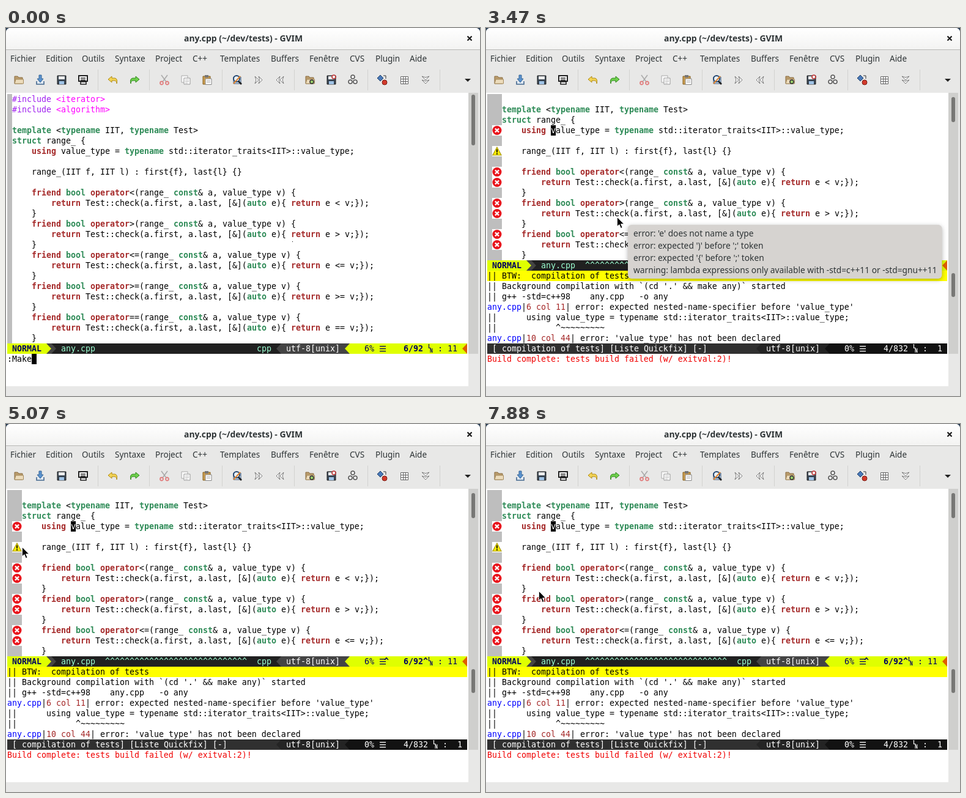
Recreate the animation shown at these times as an HTML page with a canvas. Size 775 px wide and 602 px high, loop 8 s.

```html
<!DOCTYPE html>
<html lang="fr">
<head>
<meta charset="utf-8">
<title>GVIM</title>
<style>
html, body { margin: 0; width: 100%; height: 100%; overflow: hidden; background: #e8e8e7; }
canvas { display: block; }
</style>
</head>
<body>
<canvas id="stage" width="775" height="602"></canvas>
<script>
const ctx = document.getElementById('stage').getContext('2d');
const LOOP = 8000, LEFT = 2, TOP = 108, CELL = 8, ROW = 17;
const MONO = '13.29px "DejaVu Sans Mono", monospace';
const SANS = '"Noto Sans", sans-serif';
const YELLOW = '#dfff00', NAVY = '#00005f', MINT = '#9cffd3', GREEN = '#2e8b57', BROWN = '#a52a2a';

const rowTop = row => TOP + row * ROW;

function rect(x, y, w, h, color) {
  ctx.fillStyle = color;
  ctx.fillRect(x, y, w, h);
}

function shape(x, y, d, fill, stroke, width = 1) {
  const path = new Path2D(d);
  ctx.save();
  ctx.translate(x, y);
  if (fill) { ctx.fillStyle = fill; ctx.fill(path); }
  if (stroke) { ctx.strokeStyle = stroke; ctx.lineWidth = width; ctx.stroke(path); }
  ctx.restore();
}

function label(str, x, y, font, color = '#2e3436') {
  ctx.font = font;
  ctx.fillStyle = color;
  ctx.fillText(str, x, y);
}

function put(x, row, str, color = '#000', bold = false) {
  label(str, x, rowTop(row) + 13, (bold ? 'bold ' : '') + MONO, color);
}

// ---------- source code ----------
const code = [
  '#include <iterator>', '#include <algorithm>', '',
  'template <typename IIT, typename Test>', 'struct range_ {',
  '    using value_type = typename std::iterator_traits<IIT>::value_type;', '',
  '    range_(IIT f, IIT l) : first{f}, last{l} {}', '',
  ...['<', '>', '<=', '>=', '=='].flatMap(op => [
    `    friend bool operator${op}(range_ const& a, value_type v) {`,
    `        return Test::check(a.first, a.last, [&](auto e){ return e ${op} v;});`,
    '    }'])
];
const TOKENS = /(#include)|(<iterator>|<algorithm>)|\b(using|friend|operator|return)\b|\b(template|typename|struct|bool|const|auto)\b/g;
const TOKEN_COLORS = ['#a020f0', '#ff00ff', BROWN, GREEN];

function codeLine(x, row, line) {
  let last = 0;
  for (const m of line.matchAll(TOKENS)) {
    put(x + last * CELL, row, line.slice(last, m.index));
    const kind = m.slice(1).findIndex(Boolean);
    put(x + m.index * CELL, row, m[0], TOKEN_COLORS[kind], kind > 1);
    last = m.index + m[0].length;
  }
  put(x + last * CELL, row, line.slice(last));
}

function errorSign(row) {
  const y = rowTop(row) + 8.5;
  rect(10, y - 8.5, 16, ROW, '#fff');
  shape(18, y, 'M-7.5 0a7.5 7.5 0 1 0 15 0a7.5 7.5 0 1 0 -15 0', '#e8141c');
  shape(18, y, 'M-3 -3L3 3M3 -3L-3 3', null, '#fff', 2.4);
}

function warningSign(row) {
  const y = rowTop(row) + 8.5;
  rect(10, y - 8.5, 16, ROW, '#fff');
  shape(18, y, 'M0 -6.5L7 6.5H-7Z', '#ffee00', '#a89800', 1.2);
  shape(18, y, 'M0 -3V2M0 3.3V5.2', null, '#000', 1.8);
}

// ---------- status lines ----------
function arrow(x, row, dir, color) {
  shape(dir > 0 ? x : x + CELL, rowTop(row), `M0 0L${dir * CELL} 8.5L0 17Z`, color);
}

function menuGlyph(x, row, color) {
  for (let i = 0; i < 3; i++) rect(x + 1, rowTop(row) + 4 + i * 4, 10, 1.3, color);
}

function lineGlyph(x, row, color) {
  const y = rowTop(row), font = 'bold 8px "DejaVu Sans Mono", monospace';
  label('L', x, y + 8, font, color);
  label('N', x + 3, y + 15, font, color);
}

function editorStatus(row, building, carets) {
  const y = rowTop(row), end = building ? 210 : 74;
  rect(2, y, 752, ROW, '#202020');
  rect(66, y, end - 66, ROW, '#444');
  arrow(end, row, 1, '#444');
  rect(2, y, 64, ROW, YELLOW);
  arrow(66, row, 1, YELLOW);
  put(10, row, 'NORMAL', NAVY, true);
  if (building) {
    put(82, row, '^^', '#fff');
    shape(98, y, 'M0 0L8 8.5L0 17', null, '#fff');
    put(106, row, '^Build^tests', '#fff');
  }
  put(end + 16, row, 'any.cpp', MINT);
  if (carets) put(end + 88, row, '^'.repeat((394 - end - 88) / CELL), MINT);
  put(410, row, 'cpp', MINT);
  arrow(442, row, -1, '#444');
  rect(450, y, 112, ROW, '#444');
  put(458, row, 'utf-8[unix]', '#fff');
  arrow(554, row, -1, YELLOW);
  rect(562, y, 192, ROW, YELLOW);
  put(586, row, '6%', NAVY);
  menuGlyph(610, row, NAVY);
  if (carets) put(618, row, '^', NAVY, true);
  put(650, row, carets ? '6/92^' : '6/92', NAVY, true);
  lineGlyph(690, row, NAVY);
  put(706, row, ': 11', NAVY);
  arrow(746, row, -1, '#df5f00');
}

function quickfixStatus(done) {
  const row = 24, y = rowTop(row), shift = done ? 0 : 16;
  rect(2, y, 752, ROW, '#303030');
  arrow(442 + shift, row, -1, '#242424');
  rect(450 + shift, y, 304 - shift, ROW, '#242424');
  arrow(554 + shift, row, -1, '#121212');
  rect(562 + shift, y, 192 - shift, ROW, '#121212');
  put(10, row, '[ compilation of tests] [Liste Quickfix] [-]', '#fff');
  put(458 + shift, row, 'utf-8[unix]', '#fff');
  put(done ? 586 : 594, row, done ? '0%' : '50%', '#fff');
  menuGlyph(610 + shift, row, '#fff');
  put(650 + shift, row, done ? '4/832' : '1/2', '#fff');
  lineGlyph(698, row, '#fff');
  put(714, row, ':  1', '#fff');
}

const log = [
  '|| BTW:  compilation of tests',
  "|| Background compilation with `(cd '.' && make any)` started",
  '|| g++ -std=c++98    any.cpp   -o any',
  "any.cpp|6 col 11| error: expected nested-name-specifier before 'value_type'",
  '||      using value_type = typename std::iterator_traits<IIT>::value_type;',
  '||            ^~~~~~~~~~',
  "any.cpp|10 col 44| error: 'value_type' has not been declared"
];

function quickfix(count) {
  rect(2, rowTop(17), 752, ROW, '#ff0');
  log.slice(0, count).forEach((line, i) => {
    let x = LEFT;
    line.split('|').forEach((part, k, parts) => {
      if (k < 2) {
        put(x, 17 + i, part, k ? BROWN : '#00f');
        x += part.length * CELL;
        put(x, 17 + i, '|');
        x += CELL;
      } else put(x, 17 + i, part);
    });
  });
}

// ---------- window frame ----------
const menus = { Fichier: 8, Edition: 66, Outils: 125, Syntaxe: 179, Project: 245, 'C++': 306, Templates: 351,
  Buffers: 434, 'Fenêtre': 497, CVS: 563, Plugin: 605, Aide: 661 };

const FLOPPY = 'M-7 -7H7V7H-7Z', GEAR = 'M-3 0a3 3 0 1 0 6 0a3 3 0 1 0 -6 0';

function floppy(x) {
  shape(x, 85, FLOPPY, '#3a4653', '#222');
  rect(x - 5, 79, 10, 5, '#eee');
  rect(x - 4, 87, 8, 5, '#9fc3e6');
}

function folder(x) {
  shape(x, 85, 'M-7 6V-6H-2L0 -4H6V6Z', '#b99b6c', '#8a6c40');
  shape(x, 85, 'M-5 -1H7.5V6H-7Z', '#ecdcbc', '#a58a5c');
}

function chevrons(x, angle) {
  ctx.save();
  ctx.translate(x, 85);
  ctx.rotate(angle);
  for (const dx of [-6, 0]) shape(dx, 0, 'M0 -6L6 0L0 6L2 0Z', '#fff', '#777');
  ctx.restore();
}

function toolbar() {
  for (const x of [151, 235, 354, 472, 592, 710]) rect(x - 1, 68, 1, 34, '#d2d2d0');
  folder(21);
  shape(56, 85, 'M-6 2V7H6V2', '#dfe8f2', '#44688f', 1.6);
  shape(56, 85, 'M-2 -8H2V-2H5L0 4L-5 -2H-2Z', '#5b93cf', '#356496');
  floppy(91);
  shape(126, 85, 'M-7 -7H7V2H-7Z', '#fff', '#222', 2);
  shape(126, 85, 'M-4 -3H4M-4 0H4', null, '#222', 1.4);
  shape(126, 85, 'M-4 3H5V7H-4Z', '#eee', '#222', 1.6);
  const back = 'M-8 -1L-2 -6V-3H3Q8 -2 6 6Q6 1 2 1H-2V4Z';
  shape(175, 85, back, '#f3d454', '#b18b14');
  ctx.save();
  ctx.translate(210, 85);
  ctx.scale(-1, 1);
  shape(0, 0, back, '#6fd04c', '#2f8a1c');
  ctx.restore();
  shape(259, 85, 'M-5 -8L3 3M5 -8L-3 3', null, '#aaa', 1.6);
  shape(259, 85, 'M-7 5a2.5 2.5 0 1 0 5 0a2.5 2.5 0 1 0 -5 0M2 5a2.5 2.5 0 1 0 5 0a2.5 2.5 0 1 0 -5 0', null, '#e08080', 1.8);
  shape(294, 85, 'M-7 -7H3V4H-7Z', '#f8f8f8', '#aaa');
  shape(294, 85, 'M-3 -3H7V7H-3Z', '#fcfcfc', '#999');
  shape(294, 85, 'M-1 0H5M-1 2.5H5M-1 5H3', null, '#bbb');
  shape(329, 85, 'M-7 -6H5V7H-7Z', '#c99b4e', '#86601f');
  rect(325, 77, 6, 4, '#777');
  shape(329, 85, 'M-3 -2H7V7.5H-3Z', '#fff', '#888');
  shape(329, 85, 'M-1 1H5M-1 3.5H5', null, '#aaa');
  shape(378, 85, 'M-6 -5H6V6H-6Z', '#cfe0f2', '#36577d');
  shape(378, 85, 'M-6 -2a5 5 0 1 0 10 0a5 5 0 1 0 -10 0', '#e6f0fa', '#23456e', 2);
  shape(378, 85, 'M2 2L7 7', null, '#222', 2.6);
  shape(378, 85, 'M-6 6L5 -6', null, '#e0822c', 2);
  chevrons(413, 0);
  chevrons(448, Math.PI);
  folder(497);
  shape(500, 88, GEAR, '#9ad06a', '#333', 1.5);
  floppy(532);
  shape(536, 80, GEAR, '#f0f0f0', '#b33', 1.5);
  for (const [x, y] of [[567, 80], [563, 88], [571, 88]]) shape(x, y, GEAR, '#f4f4f4', '#555', 1.5);
  shape(612, 82, 'M0 -5L5 0L0 5L-5 0Z', '#4979b8', '#23426b');
  shape(619, 89, 'M-4 0a4 4 0 1 0 8 0a4 4 0 1 0 -8 0', '#d33a2c', '#7c1c14');
  shape(619, 80, 'M-2 -2H2V3', null, '#333');
  shape(651.5, 85.5, 'M-6 -6H6V6H-6ZM-2 -6V6M2 -6V6M-6 -2H6M-6 2H6', '#fff', '#666');
  chevrons(686, Math.PI / 2);
  shape(755, 85, 'M-5 -2H5L0 3Z', '#222');
}

function frame() {
  rect(0, 0, 775, 602, '#263b52');
  ctx.beginPath();
  ctx.roundRect(0, 0, 775, 602, [7, 7, 0, 0]);
  ctx.fillStyle = '#e8e8e7';
  ctx.fill();
  const shine = ctx.createLinearGradient(0, 0, 0, 35);
  shine.addColorStop(0, '#fff');
  shine.addColorStop(1, '#f3f3f2');
  ctx.beginPath();
  ctx.roundRect(0, 0, 775, 35, [7, 7, 0, 0]);
  ctx.fillStyle = shine;
  ctx.fill();
  rect(0, 35, 775, 1, '#b8b8b5');
  ctx.textAlign = 'center';
  label('any.cpp (~/dev/tests) - GVIM', 388, 22, `bold 13.9px ${SANS}`);
  ctx.textAlign = 'left';
  shape(758, 17, 'M-3.5 -3.5L3.5 3.5M3.5 -3.5L-3.5 3.5', null, '#111', 2);
  for (const name in menus) label(name, menus[name] - 1, 55, `13.5px ${SANS}`);
  toolbar();
  rect(0, 106, 756, 480, '#fff');
  rect(756, 106, 16, 427, '#cfcfcd');
}

function thumb(y, h) {
  ctx.beginPath();
  ctx.roundRect(761, y, 6, h, 3);
  ctx.fillStyle = '#777775';
  ctx.fill();
}

// ---------- pointer and balloons ----------
const balloons = {
  lambda: { fill: '#d6d3d0', lines: ["error: 'e' does not name a type", "error: expected ')' before ';' token",
    "error: expected '{' before ';' token", 'warning: lambda expressions only available with -std=c++11 or -std=gnu++11'] },
  lists: { fill: '#e6e4e2', lines: ['warning: extended initializer lists only available with -std=c++11 or -std=gnu++11'] },
  name: { fill: '#e6e4e2', lines: ["error: expected nested-name-specifier before 'value_type'"] }
};

function balloon({ fill, lines }, x, y) {
  const font = `13.75px ${SANS}`;
  ctx.font = font;
  const width = Math.max(...lines.map(line => ctx.measureText(line).width));
  ctx.save();
  ctx.shadowColor = 'rgba(0,0,0,.3)';
  ctx.shadowBlur = 7;
  ctx.shadowOffsetY = 2;
  ctx.fillStyle = fill;
  ctx.beginPath();
  ctx.roundRect(x - 9, y - 14, width + 17, lines.length * 20 + 8, 6);
  ctx.fill();
  ctx.restore();
  lines.forEach((line, i) => label(line, x, y + 5 + i * 20, font));
}

// time, pointer x and y, then balloon with its text position
const moves = [
  [2680, 452, 349], [2810, 338, 342], [2950, 305, 335], [3070, 272, 326], [3200, 240, 316], [3320, 214, 309],
  [3470, 214, 309, 'lambda', 241, 336], [3890, 210, 306], [4010, 207, 303], [4170, 204, 302, 'lambda', 231, 329],
  [4310, 150, 268], [4430, 88, 226], [4550, 36, 192], [4680, 7, 177], [4800, 12, 202],
  [4940, 12, 202, 'lists', 36, 228], [5070, 26, 201], [5210, 26, 201, 'lists', 50, 227],
  [5720, 20, 162], [5870, 18, 157], [6010, 22, 162, 'name', 46, 188], [6130, 18, 158], [6280, 20, 160],
  [6430, 20, 160, 'name', 44, 186], [7580, 33, 175, 'name', 44, 186], [7730, 109, 270], [7880, 86, 273]
];

function draw(t) {
  const split = t >= 150, scrolled = t >= 430, wide = t >= 570, signs = t >= 720, done = t >= 2680;
  const rows = split ? 16 : 24, gutter = wide ? 24 : 8, first = scrolled ? 2 : 0;
  frame();
  rect(2, 108, gutter, rows * ROW, '#bebebe');
  code.slice(first, first + rows).forEach((line, row) => codeLine(LEFT + gutter, row, line));
  editorStatus(rows, wide && !done, wide);
  if (signs) {
    [3, 7, 8, 10, 11, 13, 14].forEach(errorSign);
    warningSign(5);
  }
  if (split) {
    quickfix(signs ? 7 : t >= 270 ? 3 : 1);
    quickfixStatus(done);
    thumb(signs ? 113 : 109, 41);
    thumb(401, 39);
  } else {
    thumb(109, 83);
    put(2, 25, ':Make');
    rect(42, rowTop(25), CELL, ROW, '#000');
    rect(468, 349, 1, 1, '#000');
  }
  if (done) {
    put(2, 25, 'Build complete: tests build failed (w/ exitval:2)!', '#f00000');
    rect(106, rowTop(3), CELL, ROW, '#000');
    put(106, 3, 'v', '#fff');
  } else if (t >= 270) put(2, 25, 'Compilation of tests started.');
  if (signs && !done) rect(26, rowTop(14), CELL, ROW, '#000');

  const move = moves.findLast(m => m[0] <= t);
  if (move) {
    const [, x, y, name, textX, textY] = move;
    if (name) balloon(balloons[name], textX, textY);
    shape(x + .5, y + .5, 'M0 0V15L3.5 12L6 18L8.5 17L6 11.2H11Z', '#000', '#fff', .8);
  }
}

function tick() {
  draw(performance.now() % LOOP);
  requestAnimationFrame(tick);
}
tick();
</script>
</body>
</html>
```
